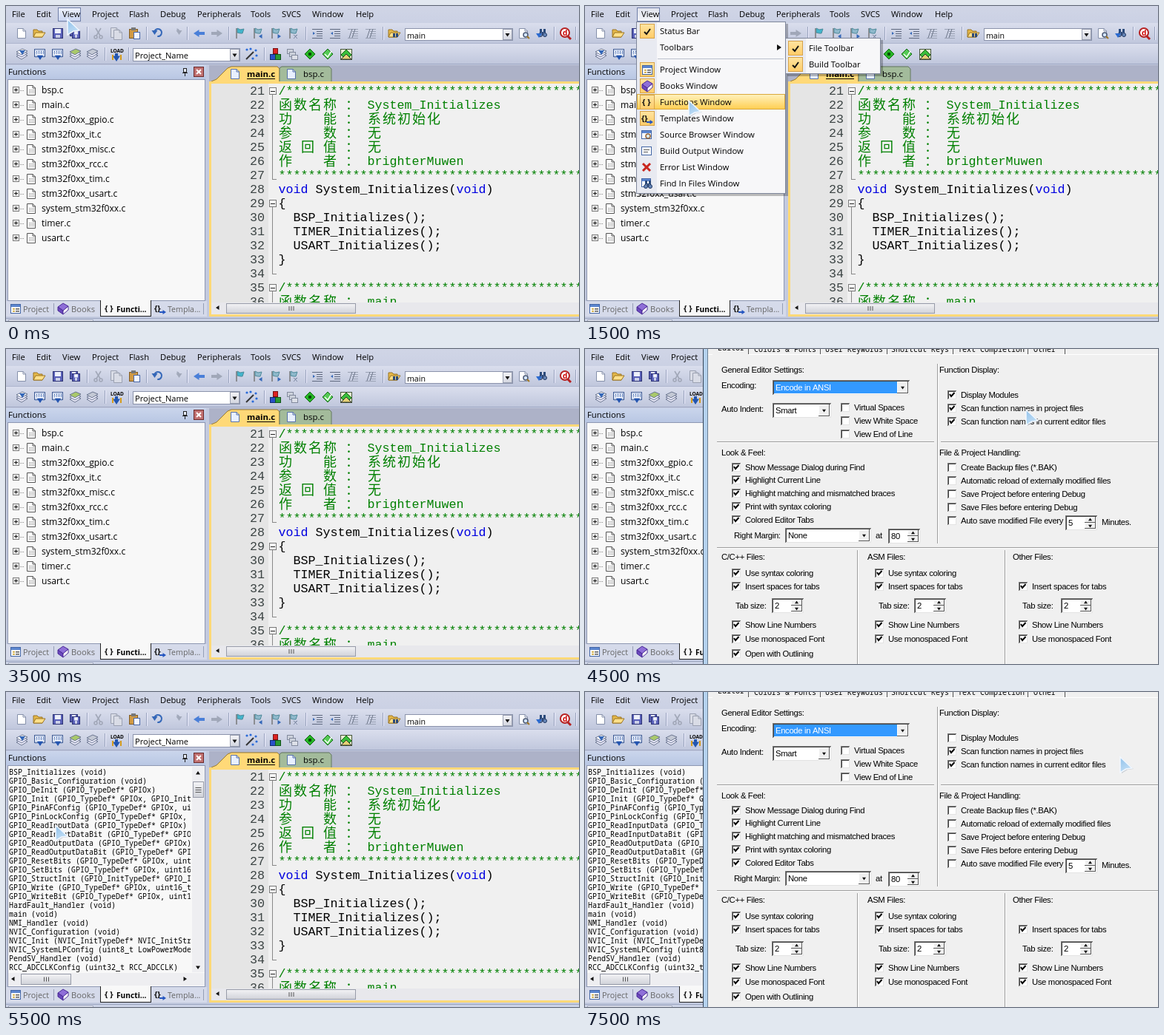
These frames come from a looping animation (773 by 426 pixels, 8 s). An HTML page with a canvas:

```html
<!DOCTYPE html>
<html lang="en">
<head>
<meta charset="utf-8">
<title>Functions window</title>
<style>
html, body { margin: 0; width: 100%; height: 100%; overflow: hidden; background: #c3cadf; }
canvas { display: block; }
</style>
</head>
<body>
<canvas id="stage" width="773" height="426"></canvas>
<script>
const g = document.getElementById('stage').getContext('2d');
const W = 773, H = 426, STEP = 500;
const UI = '"Open Sans", "Noto Sans", sans-serif';
const MONO = '"Noto Sans Mono", "DejaVu Sans Mono", monospace';
const CODE = '"Liberation Mono", monospace';
const CJK = '"Noto Sans CJK SC", "Noto Sans CJK", sans-serif';
const DLG = '11.3px "Liberation Sans", sans-serif';
const PAPER = '#f8f8f8', GOLD = '#ffd978';
const ui = (size, bold) => (bold ? 'bold ' : '') + size + 'px ' + UI;

// One entry per half second
const steps = [
  { hover: 1, at: [82, 18] },
  { menu: 1, hot: 1, at: [150, 52] },
  { menu: 1, sub: 1, hot: 1, at: [190, 54] },
  { menu: 1, sub: 1, hot: 4, at: [139, 128] },
  { menu: 1, sub: 1, hot: -1, at: [123, 380] },
  { menu: 1, sub: 1, hot: -1, at: [150, 402] },
  { menu: 1, sub: 1, hot: -1, at: [611, 200] },
  {},
  {},
  { dialog: 1, modules: 1, select: 1, at: [594, 82] },
  { dialog: 1, at: [445, 252] },
  { flat: 1, at: [66, 180] },
  { flat: 1, at: [66, 180] },
  { flat: 1, at: [62, 233] },
  { flat: 1, at: [304, 82] },
  { flat: 1, dialog: 1, select: 1, at: [721, 88] }
];

const files = ['bsp.c', 'main.c', 'stm32f0xx_gpio.c', 'stm32f0xx_it.c', 'stm32f0xx_misc.c',
  'stm32f0xx_rcc.c', 'stm32f0xx_tim.c', 'stm32f0xx_usart.c', 'system_stm32f0xx.c', 'timer.c', 'usart.c'];

const port = '(GPIO_TypeDef* GPIOx';
const functions = ['BSP_Initializes (void)', 'GPIO_Basic_Configuration (void)',
  `GPIO_DeInit ${port})`, `GPIO_Init ${port}, GPIO_InitTypeDef*`, `GPIO_PinAFConfig ${port}, uint16_t`,
  `GPIO_PinLockConfig ${port}, uint16_t`, `GPIO_ReadInputData ${port})`, `GPIO_ReadInputDataBit ${port}`,
  `GPIO_ReadOutputData ${port})`, `GPIO_ReadOutputDataBit ${port}`, `GPIO_ResetBits ${port}, uint16_t`,
  `GPIO_SetBits ${port}, uint16_t`, 'GPIO_StructInit (GPIO_InitTypeDef* GPIO_InitStruct)',
  `GPIO_Write ${port}, uint16_t`, `GPIO_WriteBit ${port}, uint16_t`, 'HardFault_Handler (void)',
  'main (void)', 'NMI_Handler (void)', 'NVIC_Configuration (void)',
  'NVIC_Init (NVIC_InitTypeDef* NVIC_InitStruct)', 'NVIC_SystemLPConfig (uint8_t LowPowerMode)',
  'PendSV_Handler (void)', 'RCC_ADCCLKConfig (uint32_t RCC_ADCCLK)'];

const stars = '*'.repeat(45);
const code = ['/' + stars, '函数名称 ： System_Initializes', '功    能 ： 系统初始化', '参    数 ： 无',
  '返 回 值 ： 无', '作    者 ： brighterMuwen', stars, 'void System_Initializes(void)', '{',
  '  BSP_Initializes();', '  TIMER_Initializes();', '  USART_Initializes();', '}', '', '/' + stars,
  '函数名称 ： main'];

function fill(x, y, w, h, c) { g.fillStyle = c; g.fillRect(x, y, w, h); }
function box(x, y, w, h, c, edge) {
  if (c) fill(x, y, w, h, c);
  if (edge) { g.strokeStyle = edge; g.lineWidth = 1; g.strokeRect(x + .5, y + .5, w - 1, h - 1); }
}
function shade(x, y, w, h, a, b, edge) {
  const s = g.createLinearGradient(0, y, 0, y + h);
  s.addColorStop(0, a); s.addColorStop(1, b);
  box(x, y, w, h, s, edge);
}
function path(p, c, edge, width = 1) {
  g.beginPath();
  for (let i = 0; i < p.length; i += 2) g.lineTo(p[i], p[i + 1]);
  if (c) { g.closePath(); g.fillStyle = c; g.fill(); }
  if (edge) { g.strokeStyle = edge; g.lineWidth = width; g.stroke(); }
}
function dot(x, y, r, c, edge, width = 1) {
  g.beginPath(); g.arc(x, y, r, 0, 7);
  if (c) { g.fillStyle = c; g.fill(); }
  if (edge) { g.strokeStyle = edge; g.lineWidth = width; g.stroke(); }
}
function text(s, x, y, font, c = '#000') { g.font = font; g.fillStyle = c; g.fillText(s, x, y); }
function label(s, x, y, c) {
  g.letterSpacing = '-0.35px';
  text(s, x, y + 4, DLG, c);
  g.letterSpacing = '0px';
}
function clip(x, y, w, h, draw) {
  g.save(); g.beginPath(); g.rect(x, y, w, h); g.clip(); draw(); g.restore();
}
function arrow(x, y, dx, dy, r = 3, c = '#111') {
  path([x + dx * r, y + dy * r, x - dx * r / 2 + dy * r, y - dy * r / 2 + dx * r,
    x - dx * r / 2 - dy * r, y - dy * r / 2 - dx * r], c);
}
function tick(x, y) { path([x, y, x + 3, y + 3, x + 8, y - 4], null, '#111', 2); }

// Small icons, placed by their top left corner
function page(x, y, c = '#fff', edge = '#8590aa') {
  path([x + .5, y + .5, x + 8, y + .5, x + 11.5, y + 4, x + 11.5, y + 13.5, x + .5, y + 13.5, x + .5, y + .5], c, edge);
  path([x + 8, y, x + 8, y + 4, x + 12, y + 4], null, edge);
}
function folder(x, y) {
  path([x, y + 3, x + 5, y + 3, x + 7, y + 5, x + 12, y + 5, x + 12, y + 13, x, y + 13], '#e5b84a', '#9a7422');
  path([x + 3, y + 7, x + 16, y + 7, x + 12, y + 13, x, y + 13], '#ffe08a', '#9a7422');
}
function disk(x, y, s = 14) {
  box(x, y, s, s, '#5960b8', '#2c3274');
  fill(x + 3, y + 1, s - 6, s / 2 - 1, '#edf0fb');
  fill(x + 4, y + s - 5, s - 8, 4, '#c9cee8');
}
function flag(x, y, c) {
  path([x + 2, y, x + 2, y + 14], null, '#777', 1.5);
  path([x + 3, y, x + 7, y + 2, x + 12, y + 1, x + 10, y + 7, x + 7, y + 7, x + 3, y + 6], c, '#4f8a9a');
}
function lines(x, y, c, n = 5) {
  for (let i = 0; i < n; i++) fill(x + (i % 4 ? 6 : 0), y + i * 3, i % 4 ? 8 : 14, 1, c);
}
function stack(x, y, c) {
  for (let i = 2; i >= 0; i--)
    path([x, y + 5 + i * 3, x + 8, y + 1 + i * 3, x + 15, y + 4 + i * 3, x + 7, y + 9 + i * 3], i ? '#eef' : c, '#6a758f');
}
function grid(x, y) {
  box(x, y, 15, 11, '#f7f9ff', '#3d5a94');
  for (let i = 3; i < 14; i += 3) { fill(x + i, y + 2, 1, 5, '#6a88c0'); fill(x + 1, y + i - 1, 13, 1, '#a9bbdd'); }
  arrow(x + 8, y + 11, 0, 1, 4, '#2455b0');
}
function glasses(x, y) {
  fill(x + 2, y, 3, 5, '#2b4a7a'); fill(x + 7, y, 3, 5, '#2b4a7a'); fill(x + 5, y + 4, 2, 3, '#2b4a7a');
  dot(x + 3, y + 8, 2.5, '#6a8abb', '#1f3560'); dot(x + 9, y + 8, 2.5, '#6a8abb', '#1f3560');
}
function diamond(x, y, c) { path([x + 7, y, x + 14, y + 7, x + 7, y + 14, x, y + 7], c, '#116611'); }
function book(x, y) {
  path([x, y + 5, x + 7, y, x + 14, y + 4, x + 7, y + 10], '#8f6fd8', '#4a2a96');
  path([x, y + 5, x + 7, y + 10, x + 7, y + 15, x, y + 10], '#6b49bd', '#4a2a96');
  path([x + 7, y + 10, x + 14, y + 4, x + 14, y + 9, x + 7, y + 15], '#fff', '#4a2a96');
}
function pane(x, y) {
  box(x, y, 14, 13, '#fff', '#4265a5'); fill(x + 1, y + 1, 12, 3, '#5c86cf');
  fill(x + 3, y + 6, 3, 1.5, '#c69a20'); fill(x + 7, y + 6, 5, 1.5, '#555');
  fill(x + 3, y + 9, 3, 1.5, '#c69a20'); fill(x + 7, y + 9, 5, 1.5, '#555');
}
function braces(x, y, jump) {
  text(jump ? '{}' : '{ }', x, y + 11, ui(11, 1), '#111');
  if (jump) { path([x + 7, y + 12, x + 12, y + 12], null, '#2455c0', 2); arrow(x + 13, y + 12, 1, 0, 3, '#2455c0'); }
}
function bend(x, y, s, c) {
  g.beginPath(); g.arc(x, y, 5, s > 0 ? 3.6 : -.5, s > 0 ? 8 : 5, s < 0);
  g.strokeStyle = c; g.lineWidth = 2; g.stroke();
  arrow(x - s * 4.5, y - 1, 0, 1, 4, c);
}
function combo(x, y, w, h, s, size) {
  box(x, y, w, h, '#fff', '#8b93ab');
  shade(x + w - 14, y + 1, 13, h - 2, '#f5f5f8', '#d2d5df', '#9aa0b2');
  arrow(x + w - 7.5, y + h / 2, 0, 1, 3);
  text(s, x + 3, y + h / 2 + 5, ui(size));
}

function toolbars(s) {
  shade(0, 0, W, 23, '#d0d5e6', '#cbd1e4');
  shade(0, 23, W, 28, '#dadeed', '#bfc6dc');
  shade(0, 51, W, 28, '#dadeed', '#bfc6dc');
  fill(0, 50, W, 1, '#aeb6ce'); fill(0, 78, W, 1, '#9ea7c2');
  if (s.hover || s.menu) shade(70, 2, 31, 19, s.menu ? '#dfe2ec' : '#eef1fa', s.menu ? '#f4f5f9' : '#c9d5f2', '#7180a8');
  const names = ['File', 8, 'Edit', 41, 'View', 76, 'Project', 116, 'Flash', 166, 'Debug', 208,
    'Peripherals', 258, 'Tools', 330, 'SVCS', 372, 'Window', 413, 'Help', 472];
  for (let i = 0; i < names.length; i += 2) text(names[i], names[i + 1], 15, ui(11.2));
  for (const x of [109, 189, 244, 300, 404, 508, 739, 768]) { fill(x, 28, 1, 18, '#98a2bc'); fill(x + 1, 28, 1, 18, '#eef'); }
  for (const x of [133, 165, 348]) { fill(x, 56, 1, 18, '#98a2bc'); fill(x + 1, 56, 1, 18, '#eef'); }
  page(15, 30); folder(37, 29); disk(63, 30); disk(86, 30, 11); disk(89, 33, 11);
  path([121, 30, 127, 40], null, '#a0a6b6', 1.5); path([128, 30, 122, 40], null, '#a0a6b6', 1.5);
  dot(121, 42, 2, null, '#a0a6b6', 1.5); dot(128, 42, 2, null, '#a0a6b6', 1.5);
  page(141, 29, '#d9dce6', '#9ba1b1'); page(145, 32, '#d9dce6', '#9ba1b1');
  box(166, 31, 12, 13, '#d19a44', '#815b20'); fill(169, 29, 6, 4, '#777'); box(172, 35, 9, 10, '#f4f6ff', '#4867a8');
  bend(205, 36, 1, '#3467b8'); bend(229, 36, -1, '#a2a9ba');
  fill(259, 35, 9, 4, '#4a7fd8'); arrow(258, 37, -1, 0, 5, '#4a7fd8');
  fill(277, 35, 9, 4, '#a0a7b8'); arrow(287, 37, 1, 0, 5, '#a0a7b8');
  for (let i = 0; i < 4; i++) {
    flag(309 + i * 24, 30, i ? '#8fb9cc' : '#42b5cc');
    if (i === 1) arrow(344, 41, -1, 0, 3, '#3467b8');
    if (i === 2) arrow(368, 41, 1, 0, 3, '#3467b8');
    if (i === 3) path([388, 39, 393, 44, 390, 41, 393, 39, 388, 44], null, '#7a86a0');
  }
  lines(413, 31, '#5e687e'); lines(437, 31, '#5e687e');
  arrow(415, 37, 1, 0, 2, '#3467b8'); arrow(440, 37, -1, 0, 2, '#3467b8');
  for (const x of [461, 485]) {
    lines(x, 31, '#9aa2b4');
    path([x + 2, 43, x + 6, 31], null, '#6d7689'); path([x + 6, 43, x + 10, 31], null, '#6d7689');
  }
  folder(516, 29); fill(522, 37, 3, 5, '#2b4a7a'); fill(526, 37, 3, 5, '#2b4a7a');
  combo(538, 30, 146, 17, 'main', 10.6);
  page(692, 30); dot(701, 39, 3, '#d5e6ff', '#4a5874', 1.5); path([703, 41, 706, 44], null, '#a27722', 2);
  glasses(718, 31); arrow(719, 39, 0, 1, 4, '#2c6bd0');
  dot(754, 36, 6, '#fff', '#b62020', 2); path([758, 41, 762, 45], null, '#b62020', 3);
  text('d', 751, 40, ui(10, 1), '#c00');

  stack(14, 57, '#fff'); arrow(22, 62, 0, 1, 4, '#3467b8');
  grid(38, 58); grid(62, 58); stack(86, 57, '#a9c96b'); stack(109, 57, '#c4c9d5');
  text('LOAD', 141, 63, ui(6.5, 1)); arrow(149, 70, 0, 1, 5, '#2356b0'); fill(147, 64, 4, 4, '#2356b0');
  fill(143, 66, 2, 7, '#d69c1c'); fill(154, 66, 2, 7, '#d69c1c');
  combo(171, 57, 145, 18, 'Project_Name', 11.1);
  path([324, 72, 334, 62], null, '#333', 2);
  for (const [x, y] of [[325, 59], [330, 58], [337, 60], [338, 67], [333, 71]]) dot(x, y, 1.6, '#2a6ad8');
  box(360, 57, 7, 8, '#d22', '#711'); box(356, 65, 8, 8, '#2a50c8', '#112a70'); box(363, 65, 8, 8, '#2a9a35', '#115518');
  box(379, 58, 9, 7, '#cdd2dc', '#828a9d'); box(382, 62, 9, 7, '#cdd2dc', '#828a9d'); box(385, 66, 9, 7, '#dde0e8', '#828a9d');
  diamond(403, 58, '#26b726'); diamond(427, 58, '#55c955');
  fill(408, 63, 4, 4, '#0a4d0a'); path([430, 65, 434, 69, 439, 61], null, '#f6fff6', 1.5);
  box(451, 58, 16, 15, '#e9edd2', '#45563a'); diamond(452, 59, '#3bbd3b'); path([452, 72, 459, 65, 466, 72], '#e6d276', '#333');
}

function thumb(x, y, w, h) {
  shade(x, y, w, h, '#f4f4f6', '#cfd1d8', '#979ba8');
  for (let i = -3; i < 5; i += 3)
    if (w > h) fill(x + w / 2 + i, y + h / 2 - 3, 1, 6, '#555');
    else fill(x + w / 2 - 4, y + h / 2 + i, 8, 1, '#555');
}

function panel(s) {
  fill(0, 79, W, H - 79, '#c3cadf');
  shade(0, 80, 270, 19, '#cad5ec', '#b9c7e3');
  text('Functions', 3, 93, ui(11.3));
  box(239, 84, 5, 6, '#e8ecf5', '#222'); fill(238, 90, 7, 1, '#222'); fill(241, 91, 1, 4, '#222');
  box(253, 82, 14, 14, '#c07070', '#6d2a2a');
  path([257, 86, 263, 92], null, '#fff', 2); path([263, 86, 257, 92], null, '#fff', 2);
  box(2, 99, 267, 300, PAPER, '#8d97b2');
  if (s.flat) {
    clip(3, 100, 246, 279, () => functions.forEach((f, i) => text(f, 4, 112 + i * 12, '10px ' + MONO)));
    fill(251, 101, 17, 278, '#eeeef1'); arrow(259, 110, 0, -1); arrow(259, 372, 0, 1); thumb(252, 121, 15, 22);
    fill(3, 380, 265, 17, '#eeeef1'); arrow(10, 388, -1, 0); arrow(241, 388, 1, 0); thumb(20, 381, 68, 15);
  } else files.forEach((f, i) => {
    const y = 114 + i * 20;
    box(9, y - 5, 9, 9, '#fff', '#777'); fill(11, y - 1, 5, 1, '#111'); fill(13, y - 3, 1, 5, '#111');
    for (let x = 19; x < 25; x += 2) fill(x, y, 1, 1, '#888');
    page(28, y - 7, '#fff', '#555');
    for (let r = 0; r < 3; r++) for (let x = 0; x < 4; x++) fill(31 + x * 2, y - 1 + r * 2, 1, 1, '#777');
    text(f, 48, y + 4, ui(12.1));
  });
  fill(0, 399, 271, 21, '#d5daea');
  box(127, 398, 69, 22, PAPER, '#222'); fill(128, 397, 67, 2, PAPER);
  fill(64, 402, 1, 15, '#969eb5'); fill(266, 402, 1, 15, '#969eb5');
  pane(6, 403); text('Project', 23, 414, ui(10.8), '#666');
  book(70, 402); text('Books', 88, 414, ui(11.2), '#666');
  braces(133, 402); text('Functi...', 149, 414, ui(10.2, 1));
  braces(200, 402, 1); text('Templa...', 218, 414, ui(10.6), '#666');
  fill(0, 422, W, 1, '#9ba5c0'); fill(0, 423, W, 3, '#ccd3e6'); box(3, 424, 115, 5, '#eef0f6', '#a1a9bf');
}

function editor() {
  fill(274, 80, W - 274, 22, '#adb2c8');
  path([277, 102, 284, 99, 299, 84, 304, 82, 366, 82, 369, 85, 369, 103, 277, 103], GOLD, '#9b7a2d');
  path([369, 103, 369, 84, 372, 82, 436, 82, 439, 85, 439, 103], '#a3bb9b', '#65795f');
  page(303, 85, '#e8f0ff', '#5671a8'); page(379, 85, '#e8f0ff', '#5671a8');
  text('main.c', 325, 96, ui(11.4, 1)); fill(325, 98, 38, 1, '#000');
  text('bsp.c', 401, 96, ui(11.4));
  fill(274, 102, W - 274, 3, GOLD); fill(274, 102, 3, 318, GOLD); fill(274, 417, W - 274, 3, GOLD);
  fill(277, 105, 77, 297, '#e5e5e5'); fill(354, 105, W - 354, 297, '#f0f0f0');
  clip(277, 105, W - 277, 296, () => {
    code.forEach((s, i) => {
      const y = 120 + i * 19, note = i < 7 || i > 13;
      text(21 + i, 329, y, '16.667px ' + CODE, '#3c4444');
      let x = 368;
      [...s].forEach((ch, n) => {
        const wide = ch > '\u2fff', word = i === 7 && (n < 4 || (n > 23 && n < 28));
        text(ch, x - (wide ? 0 : .5), y + (wide ? 1 : 0), wide ? '300 18px ' + CJK : '16.667px ' + CODE,
          note ? '#008000' : word ? '#0000e0' : '#000');
        x += wide ? 20 : 10;
      });
    });
    for (const [a, b] of [[115, 234], [267, 362], [381, 402]]) {
      fill(359, a, 1, b - a, '#888'); fill(359, b, 6, 1, '#888');
      box(355, a - 5, 10, 10, '#f7f7f7', '#777'); fill(357, a, 6, 1, '#222');
    }
  });
  fill(277, 401, W - 277, 16, '#e8e8ec'); arrow(286, 408, -1, 0); thumb(297, 402, 175, 14);
}

function hotRow(x, y, w) { shade(x, y, w, 21, '#fff3c2', '#ffcd4e', '#d9a83c'); }
function lit(x, y) { shade(x, y - 10, 20, 20, '#ffe5a2', '#ffcb66', '#d6a24a'); }
function popup(x, y, w, h) {
  fill(x + 3, y + 3, w, h, 'rgba(0,0,0,.25)');
  box(x, y, w, h, '#f7f7f9', '#7f879b'); fill(x + 1, y + 1, 27, h - 2, '#e8eaf1');
}
function menu(s) {
  popup(69, 21, 202, 233);
  fill(98, 71, 170, 1, '#bcc1cd');
  const items = ['Status Bar', 'Toolbars', 'Project Window', 'Books Window', 'Functions Window', 'Templates Window',
    'Source Browser Window', 'Build Output Window', 'Error List Window', 'Find In Files Window'];
  items.forEach((name, i) => {
    const y = 34 + i * 22 + (i > 1 ? 8 : 0);
    if (i === s.hot) hotRow(70, y - 11, 200);
    if (!i || (i > 1 && i < 6)) lit(74, y);
    text(name, 101, y + 4, ui(11.3));
  });
  tick(80, 35); arrow(261, 56, 1, 0, 4);
  pane(77, 80); book(77, 101); braces(77, 123); braces(76, 145, 1);
  box(76, 168, 14, 12, '#fff', '#4265a5'); fill(77, 169, 12, 3, '#5c86cf'); dot(85, 176, 3, '#d8eaff', '#963', 1.5);
  box(76, 190, 14, 12, '#fff', '#4265a5'); fill(79, 194, 8, 1, '#555'); fill(79, 197, 6, 1, '#555');
  for (const d of [-5, 5]) path([83 - d, 213, 83 + d, 223], null, '#c9261e', 3);
  box(76, 233, 13, 12, '#fff', '#4265a5'); fill(77, 234, 11, 3, '#5c86cf'); glasses(79, 236);
  if (!s.sub) return;
  popup(270, 43, 129, 49);
  ['File Toolbar', 'Build Toolbar'].forEach((name, i) => {
    const y = 57 + i * 22;
    lit(274, y); tick(280, y + 1); text(name, 302, y + 4, ui(11.3));
  });
}

function sunken(x, y, w, h) {
  box(x, y, w, h, '#fff', '#e3e3e3');
  fill(x, y, w, 1, '#777'); fill(x, y, 1, h, '#777');
  fill(x + 1, y + 1, w - 2, 1, '#444'); fill(x + 1, y + 1, 1, h - 2, '#444');
}
function raised(x, y, w, h, dy) {
  box(x, y, w, h, '#efefef', '#fff');
  fill(x, y + h - 1, w, 1, '#555'); fill(x + w - 1, y, 1, h, '#555');
  arrow(x + w / 2, y + h / 2, 0, dy, 2.5);
}
function drop(x, y, w, s, sel) {
  sunken(x, y, w, 20);
  if (sel) fill(x + 2, y + 2, w - 19, 16, '#3399ff');
  label(s, x + 4, y + 10, sel ? '#fff' : '#000');
  raised(x + w - 17, y + 2, 15, 16, 1);
}
function spin(x, y, n) {
  sunken(x, y, 43, 20); label(n, x + 4, y + 10);
  raised(x + 26, y + 2, 15, 8, -1); raised(x + 26, y + 10, 15, 8, 1);
}
function check(x, y, s, on, gap = 18) {
  sunken(x, y - 6, 12, 12);
  if (on) path([x + 3, y - 1, x + 5, y + 2, x + 9.5, y - 3], null, '#000', 2);
  label(s, x + gap, y);
}
function rule(x, y, w, h) {
  fill(x, y, w, h, '#9c9c9c');
  if (w > h) fill(x, y + 1, w, 1, '#fff'); else fill(x + 1, y, 1, h, '#fff');
}

function dialog(s) {
  fill(159, 0, W - 159, H, '#f0f0f0');
  fill(159, 0, 1, H, '#38475a'); fill(160, 0, 5, H, '#b5d2ee'); fill(165, 0, 1, H, '#6b7f96');
  fill(166, 7, W - 166, 1, '#fff'); fill(172, 0, 48, 9, '#f0f0f0');
  const tabs = ['Editor', 179, 'Colors & Fonts', 228, 'User Keywords', 324, 'Shortcut Keys', 413,
    'Text Completion', 503, 'Other', 605];
  for (let i = 0; i < tabs.length; i += 2) text(tabs[i], tabs[i + 1], i ? 4 : 2, '10px ' + MONO);
  for (const x of [220, 317, 407, 496, 597, 647]) fill(x, 0, 1, 7, '#555');
  rule(475, 20, 1, 243); rule(178, 125, 293, 1); rule(480, 125, 293, 1); rule(178, 268, 595, 1);
  rule(367, 272, 1, 154); rule(566, 272, 1, 154);

  label('General Editor Settings:', 184, 28);
  label('Encoding:', 184, 49); drop(253, 42, 185, 'Encode in ANSI', s.select);
  label('Auto Indent:', 184, 81); drop(253, 73, 79, 'Smart');
  ['Virtual Spaces', 'View White Space', 'View End of Line'].forEach((n, i) => check(345, 79 + i * 18, n));
  label('Function Display:', 478, 28);
  ['Display Modules', 'Scan function names in project files', 'Scan function names in current editor files']
    .forEach((n, i) => check(489, 62 + i * 18, n, i || s.modules));
  if (!s.select) {
    g.setLineDash([1, 1]); box(505, 55, 81, 15, null, '#555'); g.setLineDash([]);
  }
  label('Look & Feel:', 184, 140);
  ['Show Message Dialog during Find', 'Highlight Current Line', 'Highlight matching and mismatched braces',
    'Print with syntax coloring', 'Colored Editor Tabs'].forEach((n, i) => check(198, 160 + i * 17.8 | 0, n, 1));
  label('Right Margin:', 201, 252); drop(270, 242, 116, 'None'); label('at', 392, 252); spin(409, 243, '80');
  label('File & Project Handling:', 478, 140);
  ['Create Backup files (*.BAK)', 'Automatic reload of externally modified files', 'Save Project before entering Debug',
    'Save Files before entering Debug', 'Auto save modified File every'].forEach((n, i) => check(489, 160 + i * 18, n));
  spin(648, 225, '5'); label('Minutes.', 697, 234);

  [['C/C++ Files:', 184, 198, 252], ['ASM Files:', 381, 391, 444], ['Other Files:', 577, 585, 642]].forEach(([n, x, c, e], i) => {
    label(n, x, 281);
    if (i < 2) check(c, 303, 'Use syntax coloring', 1);
    check(c, 321, 'Insert spaces for tabs', 1);
    label('Tab size:', c + 5, 347); spin(e, 337, '2');
    check(c, 373, 'Show Line Numbers', 1); check(c, 392, 'Use monospaced Font', 1);
    if (!i) check(c, 412, 'Open with Outlining', 1);
  });
}

function pointer(x, y) {
  const p = [[1, 0], [17, 15], [9, 16], [1, 21]];
  path(p.flatMap(([a, b]) => [x + a + 2, y + b + 1]), 'rgba(40,60,90,.2)');
  const c = g.createLinearGradient(x, y, x + 12, y + 20);
  c.addColorStop(0, '#8fc0ea'); c.addColorStop(1, '#c4e0f6');
  path(p.flat().map((v, i) => v + (i % 2 ? y : x)).concat(x + 1, y), c, '#f2f8ff', 1.5);
}

const start = performance.now();
function frame() {
  const t = Math.max(0, performance.now() - start);
  const s = steps[Math.floor(t / STEP) % steps.length];
  toolbars(s);
  panel(s);
  editor();
  if (s.menu) menu(s);
  if (s.dialog) dialog(s);
  if (s.at) pointer(...s.at);
  requestAnimationFrame(frame);
}
frame();
</script>
</body>
</html>
```
